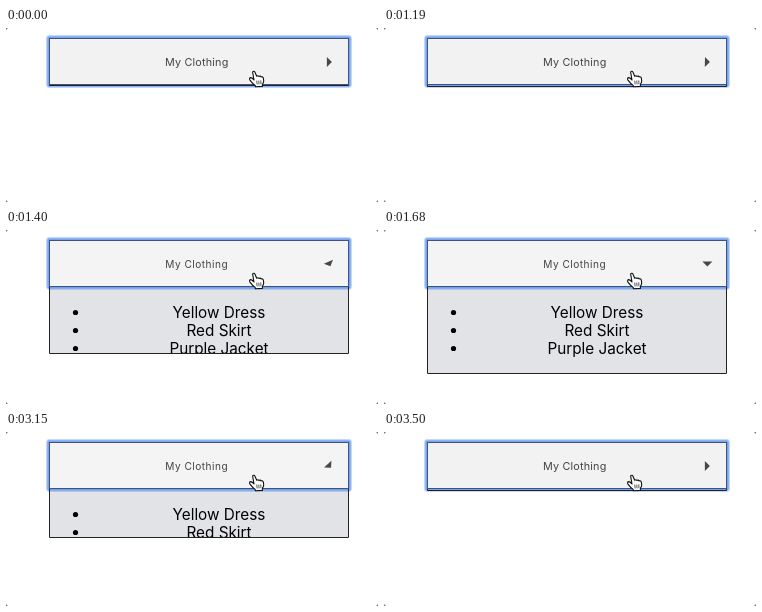
An HTML page for the animation above (3570 ms loop, 372 px wide and 174 px high).

```html
<!DOCTYPE html>
<html lang="en">
<head>
<meta charset="utf-8">
<title>Accordion</title>
<style>
  html, body { margin: 0; width: 100%; height: 100%; overflow: hidden; background: #fff; }
  svg { display: block; width: 100%; height: 100%; }
  text { font-family: Inter, "Liberation Sans", sans-serif; text-anchor: middle; }
  .items { font-size: 15.3px; fill: #000; }
</style>
</head>
<body>
<svg viewBox="0 0 372 174">
  <defs>
    <clipPath id="clip"><rect id="clipBox" x="43" y="57" width="300" height="0"/></clipPath>
  </defs>

  <path d="M0 0h2L0 2zM372 0v2l-2-2zM0 174v-2l2 2zM372 174h-2l2-2z" fill="#777"/>

  <rect id="panel" x="43" y="57" width="300" fill="#e2e3e6"/>
  <g id="items" class="items" clip-path="url(#clip)"></g>

  <g id="ring" fill="none" stroke="#6a9bee"></g>
  <path id="border" fill="none" stroke="#222"/>

  <rect id="header" x="43.5" y="10.5" width="299" height="46" stroke="#3b5580"/>
  <text id="label" x="190.7" y="38" fill="#444">My Clothing</text>
  <path id="arrow" d="M-2.5-5v10L2.5 0z" fill="#484848"/>

  <g transform="translate(.4 0)" stroke="#111" stroke-linejoin="round" stroke-linecap="round">
    <path fill="#fff" stroke-width="1.1" d="M246.2 43.8Q247.6 42.6 248.6 44.2L250.3 48.2Q251.6 47.2 252.6 48.4
      Q254 47.6 254.8 48.9Q256.6 48.4 257 50.4L257.3 53Q257.2 55 256 56.2V58.4L249 58.8L248.8 57.4
      Q246.2 55.6 243.4 51.8Q242.6 49.8 244.4 49.6Q246 49.8 247.6 52Z"/>
    <path fill="none" stroke-width=".7" d="M250.4 53l.3 3M252.4 53l.2 3M254.4 52.8l.1 3"/>
  </g>
</svg>
<script>
const LOOP = 3570, STEP = 70, DURATION = 500;
const OPEN_AT = 1178, CLOSE_AT = 3010;
const MAX_HEIGHT = 90, CONTENT = 86;
const NS = "http://www.w3.org/2000/svg";
const $ = id => document.getElementById(id);

function set(el, attrs) {
  for (const name in attrs) el.setAttribute(name, attrs[name]);
  return el;
}

function add(parent, tag, attrs) {
  return parent.appendChild(set(document.createElementNS(NS, tag), attrs));
}

["Yellow Dress", "Red Skirt", "Purple Jacket"].forEach((name, i) => {
  const y = 88 + i * 18;
  add($("items"), "circle", { cx: 69.5, cy: y - 5.5, r: 2.6 });
  add($("items"), "text", { x: 213, y }).textContent = name;
});

// Focus glow, fading outwards from the header
[.9, .75, .4].forEach((opacity, i) => {
  const d = i + .5;
  add($("ring"), "rect", {
    x: 43 - d, y: 10 - d, width: 300 + 2 * d, height: 47 + 2 * d,
    rx: i * 1.3, "stroke-opacity": opacity
  });
});

// CSS "ease": cubic-bezier(.25, .1, .25, 1)
function ease(x) {
  if (x <= 0) return 0;
  if (x >= 1) return 1;
  const curve = (a, b, s) => 3 * a * s * (1 - s) ** 2 + 3 * b * s * s * (1 - s) + s ** 3;
  let lo = 0, hi = 1;
  for (let i = 0; i < 24; i++) {
    const mid = (lo + hi) / 2;
    if (curve(.25, .25, mid) < x) lo = mid; else hi = mid;
  }
  return curve(.1, 1, lo);
}

function render(time) {
  const t = Math.floor(time % LOOP / STEP) * STEP;
  const closing = t >= CLOSE_AT;
  const p = closing
    ? 1 - ease((t - CLOSE_AT) / DURATION)
    : ease((t - OPEN_AT) / DURATION);
  const snap = closing ? Math.ceil : Math.floor;
  const h = Math.min(CONTENT, snap(p * MAX_HEIGHT));

  set($("panel"), { height: h });
  set($("clipBox"), { height: h });
  set($("border"), { d: `M43.5 57v${h + .5}h299v${-h - .5}` });
  set($("arrow"), { transform: `translate(323.4 34) rotate(${90 * p})` });

  const open = h > 1;
  set($("header"), { fill: open ? "#f4f4f4" : "#f2f2f2" });
  set($("label"), {
    "font-size": open ? 10.1 : 10.8,
    "letter-spacing": open ? .5 : .2
  });
}

function tick() {
  render(performance.now());
  requestAnimationFrame(tick);
}
tick();
</script>
</body>
</html>
```
